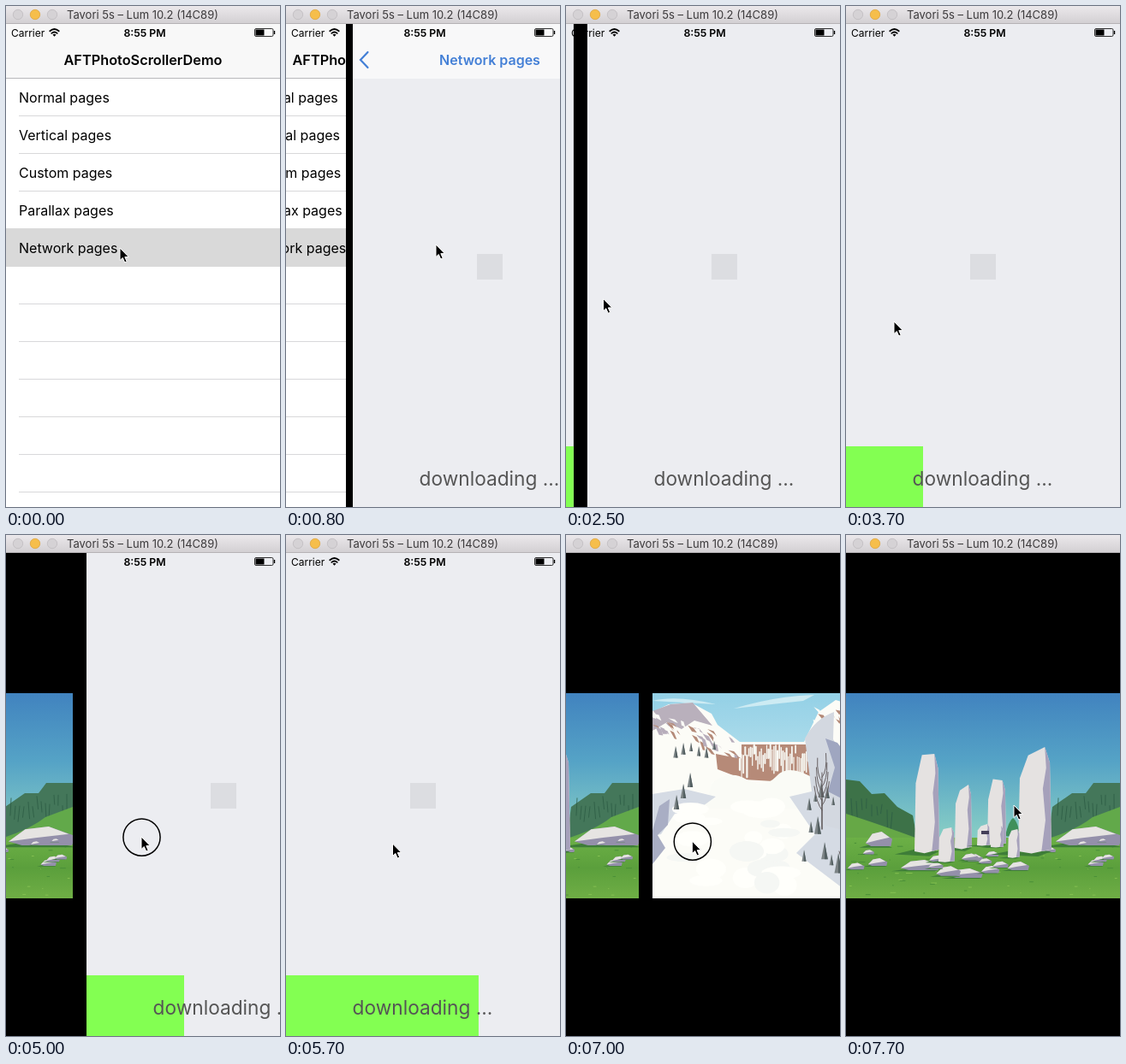
These frames come from a looping animation (320 by 586 pixels, 7800 ms). An HTML page:

```html
<!DOCTYPE html>
<html lang="en">
<head>
<meta charset="utf-8">
<title>Photo scroller</title>
<style>
  html, body { margin: 0; width: 100%; height: 100%; overflow: hidden; background: #000; }
  svg { display: block; width: 100vw; height: 100vh; font-family: Inter, Roboto, sans-serif; }
</style>
</head>
<body>
<svg id="stage" viewBox="0 0 320 586" preserveAspectRatio="none"></svg>
<script>
const LOOP = 7800, STEP = 100, PAGE_STRIDE = 336;

// ---- markup helpers ----
const rect = (x, y, w, h, fill, extra = '') =>
  `<rect x="${x}" y="${y}" width="${w}" height="${h}" fill="${fill}" ${extra}/>`;
const poly = (fill, points) => `<polygon fill="${fill}" points="${points.join(' ')}"/>`;
const path = (fill, d) => `<path fill="${fill}" d="${d}"/>`;
const line = (color, width, d) =>
  `<path fill="none" stroke="${color}" stroke-width="${width}" stroke-linecap="round" d="${d}"/>`;
const text = (x, y, size, fill, label, extra = '') =>
  `<text x="${x}" y="${y}" font-size="${size}" fill="${fill}" ${extra}>${label}</text>`;
const centered = 'text-anchor="middle"';
const heading = centered + ' font-weight="600"';
const gradient = (id, ...stops) => `<linearGradient id="${id}" x2="0" y2="1">` +
  stops.map((c, i) => `<stop offset="${i / (stops.length - 1)}" stop-color="${c}"/>`).join('') +
  '</linearGradient>';
const repeat = (count, draw) => Array.from({ length: count }, (_, i) => draw(i)).join('');

// Returns between(low, high), a repeatable random source.
function seeded(seed) {
  return (low, high) => {
    seed = (seed * 16807) % 2147483647;
    return low + (high - low) * seed / 2147483647;
  };
}

// ---- stones picture ----
function rock(x, y, w, h) {
  const top = [[x, y + h * .8], [x + w * .25, y + h * .15], [x + w * .6, y]];
  return poly('#3e7d38', [[x - w * .25, y + h * 1.1], [x + w * .5, y + h * .7], [x + w, y + h * 1.1]]) +
    poly('#9490aa', [...top, [x + w, y + h * .5], [x + w * .95, y + h], [x + w * .2, y + h]]) +
    poly('#e6e4e2', [...top, [x + w * .9, y + h * .4], [x + w * .4, y + h * .6]]);
}

function standingStone(x, top, w, base, slope) {
  const h = base - top, at = (u, v) => [x + w * u, top + h * v];
  return poly('#3e7d38', [at(-.8, 1.03), at(0, .98), at(1, 1), at(.6, 1.05)]) +
    poly('#e5e2e1', [at(0, 1), at(.05, .3), at(.3, slope), at(.8, 0), at(.95, .15), at(1, .98), at(.4, 1.02)]) +
    poly('#a6a1bb', [at(.8, 0), at(.95, .15), at(1, .98), at(.7, 1), at(.82, .7), at(.74, .4), at(.84, .2)]);
}

function stonesPicture() {
  const between = seeded(41);
  const crack = (x, y) => line('#2c5c45', .8, `M${x} ${y}l${between(-2, 2)} ${between(8, 24)}`);
  return rect(0, 185, 320, 240, 'url(#blueSky)') +
    path('#3d7248', 'M0 286L16 288 30 303 45 302 60 318 78 328 84 360H0Z') +
    path('#44775a', 'M236 355L241 318 264 302 280 302 289 290 320 290V350Z') +
    repeat(10, i => crack(i * 6, between(300, 308) + i * 2)) +
    repeat(14, i => crack(248 + i * 5, between(303, 318))) +
    path('#66a846', 'M0 326Q38 338 92 358V380H0Z') +
    path('#62a94a', 'M225 358Q267 347 288 330L320 318V380H225Z') +
    path('#3f8f5a', 'M186 352q4-18 9-21 6 4 9 24z') +
    rect(0, 354, 320, 71, 'url(#meadow)') +
    repeat(60, i => rect(between(0, 315), between(358, 422), between(1, 8), 1, i % 2 ? '#4a8f38' : '#84bf50')) +
    rock(245, 341, 78, 22) + rock(23, 347, 31, 17) + rock(64, 380, 46, 12) + rock(121, 390, 39, 11) +
    repeat(22, i => {
      const y = between(354, 388), w = 6 + (y - 350) * between(.3, .65);
      return rock(between(0, 300), y, w, w * .4);
    }) +
    standingStone(80, 256, 29, 370, .01) + standingStone(127, 292, 20, 366, .09) +
    standingStone(165, 287, 22, 362, -.02) + standingStone(153, 338, 15, 363, .1) +
    rect(158, 346, 9, 4, '#443f58') + standingStone(169, 340, 15, 365, .1) +
    standingStone(201, 248, 39, 370, .08) + standingStone(108, 342, 19, 382, .05) +
    standingStone(189, 344, 14, 377, .05);
}

// ---- snow picture ----
const pine = (x, y, h, color = '#7c8486') =>
  poly(color, [[x, y], [x + h * .19, y + h], [x - h * .19, y + h]]) +
  poly('#535f61', [[x, y], [x + h * .19, y + h], [x, y + h]]);

function bareTree(x, top, bottom, spread) {
  const twig = i => {
    const side = i % 2 ? 1 : -1, y = bottom - 22 - i * (bottom - top) / 12;
    return `M${x} ${y}q${side * spread * .7}-8 ${side * spread * (1 - i * .07)}-28`;
  };
  return line('#686163', 1, `M${x} ${top}V${bottom}` + repeat(8, twig)) +
    line('#5b5657', spread / 8, `M${x} ${bottom}V${top + 30}`);
}

function snowPicture() {
  const between = seeded(83);
  const scree = (x, y, color) => path(color,
    `M${x} ${y}l${between(3, 8)} ${between(1, 4)} ${between(1, 5)} ${between(4, 9)} ${between(-6, -2)} ${between(-4, 0)}z`);
  return rect(0, 185, 320, 240, 'url(#paleSky)') +
    path('#cdebf3', 'M95 203Q145 188 189 187L176 194ZM0 194Q29 187 74 198Z') +
    path('#fcfcf7', 'M0 207L19 198 45 196 69 209 76 222 102 242H177L194 207 214 193 263 208 282 191 320 192V425H0Z') +
    path('#b9b0bc', 'M0 206L21 198 47 196 70 223 49 217 34 227 17 219 0 229Z') +
    repeat(44, i => {
      const x = between(0, 100);
      return scree(x, 200 + x * .4 + between(0, 24), ['#b48a78', '#fcfcf7', '#b7adbb'][i % 3]);
    }) +
    repeat(26, i => {
      const x = between(186, 310);
      return scree(x, 207 + between(-6, 16) - 12 * Math.abs(Math.sin((x - 186) / 38)), i % 2 ? '#b48a78' : '#fcfcf7');
    }) +
    path('#b68a78', 'M74 256L104 262V245H184L188 284 155 282 141 288 107 286 76 274Z') +
    repeat(40, i => line('#f8f9f4', between(1, 2.4), `M${102 + i * 2.1} ${between(244, 262)}v${between(8, 32)}`)) +
    path('#fafbf6', 'M70 290Q90 274 110 286T145 282 192 287V320H60Z') +
    path('#d3d8e0', 'M178 238Q190 215 212 207L211 239 240 285 236 312 266 335 264 356 204 346 186 300Z') +
    path('#9fa6c0', 'M202 238L216 243 238 272Q246 290 238 306L228 312 205 300 213 272Z') +
    path('#a9b0c7', 'M233 312Q262 316 268 341L260 354 240 350ZM265 356Q299 373 300 400L291 425H248L267 389Z') +
    path('#d5dbe4', 'M0 303L37 297 74 306 52 322 26 326 10 350 0 352ZM160 306L190 299 202 340 239 350 265 376 252 425H238L168 372 190 350Z') +
    path('#a9aec4', 'M8 317L20 309 18 339 6 351 15 366 0 385V346Z') +
    repeat(24, i => `<ellipse cx="${between(35, 155)}" cy="${between(310, 410)}" rx="${between(9, 26)}" ry="${between(4, 13)}" fill="${i % 3 ? '#fffffb' : '#f5f7f4'}"/>`) +
    repeat(6, i => pine(27 + i * 9, between(236, 250), between(9, 15))) +
    repeat(3, i => pine(28 + i * 8, 304 - i * 13, 17)) +
    repeat(6, i => pine(270 + i * 8, between(233, 296), between(8, 20))) +
    repeat(5, i => pine(183 + i * 7, between(282, 320), between(10, 22))) +
    repeat(6, i => pine(177 + i * 8, between(326, 375), between(12, 24))) +
    bareTree(198, 278, 344, 9) + bareTree(234, 318, 420, 16) +
    pine(264, 382, 41, '#495859') + pine(248, 387, 38, '#556364') +
    line('#625f66', 1, 'M278 425V401M278 416l9-10M278 412l-7-9');
}

// ---- interface ----
function pageView(index, picture) {
  return `<g transform="translate(${index * PAGE_STRIDE} 0)">` +
    `<g id="loading${index}">` + rect(0, 21, 320, 565, '#ecedf1') +
    rect(0, 515, 0, 71, '#83ff52', `id="progress${index}"`) +
    rect(145, 290, 30, 30, '#dcdde1') +
    text(159.5, 560.5, 22.7, '#555', 'downloading ...', centered) + '</g>' +
    `<g id="picture${index}" clip-path="url(#pictureArea)">${picture}</g></g>`;
}

function listView() {
  const labels = ['Normal', 'Vertical', 'Custom', 'Parallax', 'Network'];
  return rect(0, 21, 400, 565, '#fff') + rect(0, 21, 400, 63, '#f8f8f8') +
    rect(0, 84, 400, 1, '#b9b9bb') + text(160, 69, 16.3, '#000', 'AFTPhotoScrollerDemo', heading) +
    repeat(11, i => rect(15, 128 + i * 44, 385, 1, '#d8d8da')) +
    rect(0, 260, 400, 45, '#d9d9d9') +
    repeat(labels.length, i => text(15, 113 + i * 44, 16, '#000', labels[i] + ' pages'));
}

const navBar = rect(0, 21, 328, 64, '#f8f8f9') +
  line('#437fd6', 2.2, 'M17.5 54L9 63l8.5 9') +
  text(160, 69, 16, '#437fd6', 'Network pages', heading) +
  text(288.5, 69, 16, '#437fd6', 'Guide', heading);

const statusBar = text(6, 35.5, 12, '#000', 'Carrier') +
  text(162, 35.5, 12.3, '#000', '8:55 PM', heading) +
  line('#000', 1.8, 'M51.3 29.3Q56.5 24.8 61.7 29.3M53.3 31.9Q56.5 29.2 59.7 31.9') +
  path('#000', 'M54.5 33.5Q56.5 31.8 58.5 33.5L56.5 35.8Z') +
  rect(290.5, 26.5, 21.5, 9, 'none', 'rx="1.5" stroke="#000" stroke-width=".8"') +
  rect(291.5, 27.5, 10, 7, '#000') + rect(312.8, 29, 1.4, 4, '#000');

const light = (x, fill, edge) =>
  `<circle cx="${x}" cy="10" r="5.7" fill="${fill}" stroke="${edge}" stroke-width=".8"/>`;
const windowBar = rect(0, 0, 320, 21, 'url(#chrome)') + rect(0, 20, 320, 1, '#b5b2b5') +
  light(14, '#d5d2d5', '#bfbcbf') + light(34, '#f6be4b', '#dfa53c') + light(54, '#d5d2d5', '#bfbcbf') +
  text(159.5, 15, 13, '#3c3a3c', 'Tavori 5s – Lum 10.2 (14C89)', centered);

const cursor = '<circle id="touch" cx=".5" cy=".6" r="21.6" fill="none" stroke="#000" stroke-width="1.5"/>' +
  '<path d="M0 0V14.5L3.3 11.5 5.7 17 8.2 16 5.8 10.6H10.3Z" stroke="#fff" stroke-linejoin="round"/>';

document.getElementById('stage').innerHTML = '<defs>' +
  gradient('chrome', '#ebe8eb', '#d2cfd2') +
  gradient('blueSky', '#4183bf', '#55a3c6', '#84cbc5', '#9dd5c2') +
  gradient('paleSky', '#93d0e6', '#c2e6ef', '#e8f4f3') +
  gradient('meadow', '#6cb046', '#5b9f3c', '#6fae45') +
  `<clipPath id="pictureArea">${rect(0, 185, 320, 240, '#000')}</clipPath>` +
  `<clipPath id="screen">${rect(0, 21, 320, 565, '#000')}</clipPath></defs>` +
  '<g clip-path="url(#screen)">' +
  `<g id="list">${listView()}</g><g id="detail">` + rect(-8, 21, 336, 565, '#000') +
  `<g id="scroller">${pageView(0, stonesPicture())}${pageView(1, snowPicture())}</g>` +
  `<g id="navBar">${navBar}</g></g>${statusBar}</g>${windowBar}<g id="cursor">${cursor}</g>`;

// ---- motion ----
const smooth = p => p * p * (3 - 2 * p);
const easeOut = p => 1 - (1 - p) ** 2;
const linear = p => p;

// 0 before `from`, 1 after `to`, eased in between.
const ramp = (t, from, to, ease = smooth) =>
  ease(Math.min(1, Math.max(0, (t - from) / (to - from))));

// Swipe to the second page, a half-hearted pull back that springs shut, then a full swipe back.
const scrollAt = t => PAGE_STRIDE * (ramp(t, 1500, 2700) - ramp(t, 6600, 7700)) -
  94 * (ramp(t, 4050, 5000) - ramp(t, 5000, 5600));

const downloads = [
  { id: 0, doneAt: 2700, widthAt: t => 320 * ramp(t, 800, 2270, linear) },
  { id: 1, doneAt: 6300, widthAt: t => 90 * ramp(t, 3050, 3700, linear) +
      24 * ramp(t, 3700, 5000, linear) + 206 * ramp(t, 5000, 6300, linear) }
];

// Resting points of the pointer: time, x, y.
const pointerStops = [[0, 133, 283], [800, 175, 279], [1600, 214, 341], [2150, 44, 341], [3200, 42, 346],
  [3700, 56, 369], [4050, 56, 369], [5000, 158, 353], [6400, 91, 369], [6650, 86, 411], [7300, 196, 316]];
const touches = [[1600, 2250], [3950, 5100], [6650, 7200]];

function pointerAt(t) {
  let [, x, y] = pointerStops[0];
  for (let i = 1; i < pointerStops.length; i++) {
    const [from, x0, y0] = pointerStops[i - 1], [to, x1, y1] = pointerStops[i];
    const p = ramp(t, from, to);
    x += (x1 - x0) * p;
    y += (y1 - y0) * p;
  }
  return [x, y];
}

const el = id => document.getElementById(id);
const move = (id, x, y = 0) => el(id).setAttribute('transform', `translate(${x.toFixed(2)} ${y.toFixed(2)})`);
const show = (id, on) => el(id).setAttribute('display', on ? 'inline' : 'none');

function render(t) {
  const pushed = ramp(t, 400, 1190, easeOut);
  move('list', -79.4 * pushed);
  move('detail', 320 * (1 - pushed));
  show('detail', pushed > 0);
  move('scroller', -scrollAt(t));
  el('navBar').setAttribute('opacity', 1 - ramp(t, 1800, 2200));
  for (const { id, doneAt, widthAt } of downloads) {
    el('progress' + id).setAttribute('width', widthAt(t));
    show('loading' + id, t < doneAt);
    show('picture' + id, t >= doneAt);
  }
  move('cursor', ...pointerAt(t));
  show('touch', touches.some(([from, to]) => t >= from && t < to));
}

const start = performance.now();
function tick() {
  const elapsed = (performance.now() - start) % LOOP;
  render(Math.floor(elapsed / STEP) * STEP);
  requestAnimationFrame(tick);
}
tick();
</script>
</body>
</html>
```
